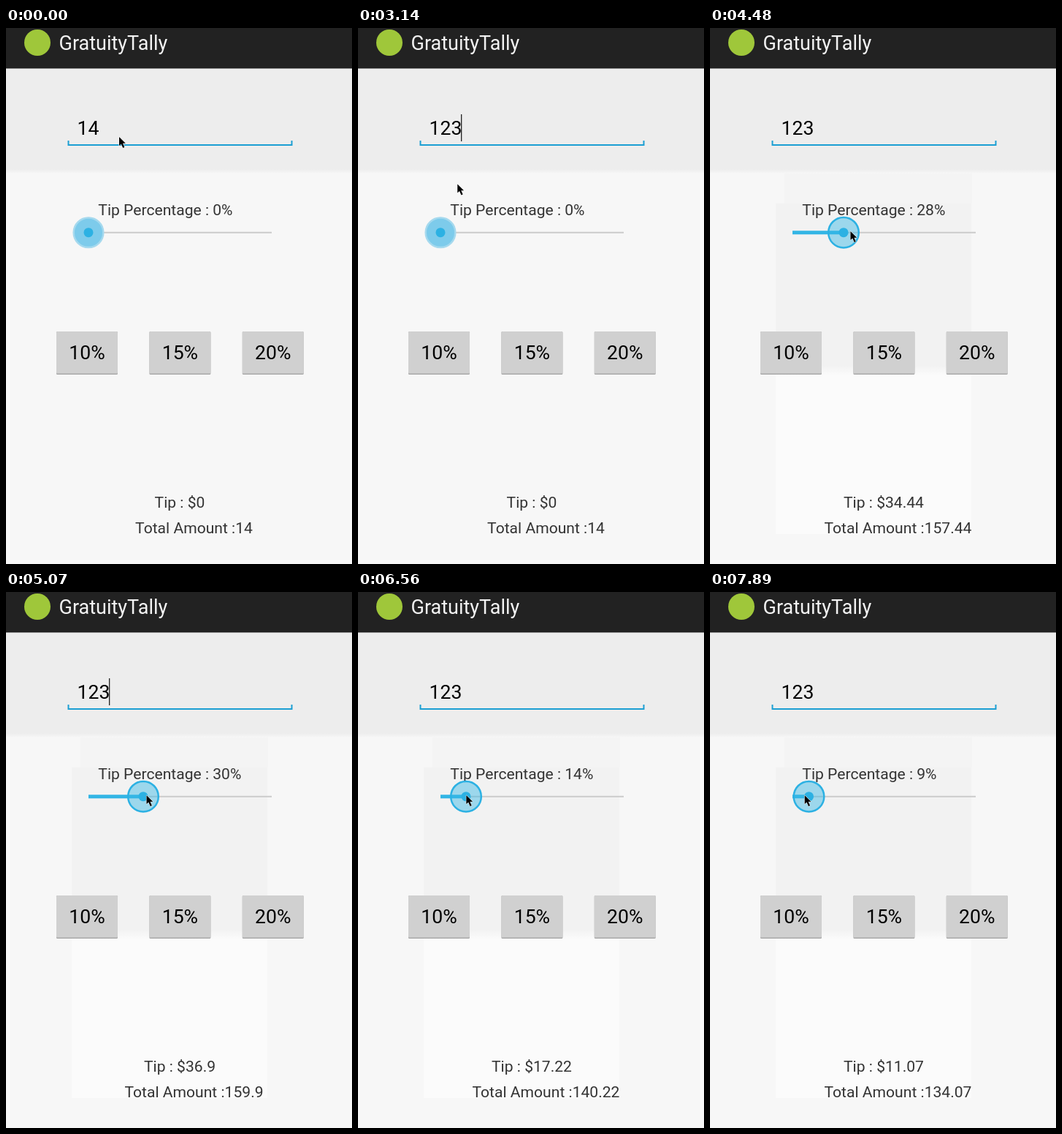
Recreate the animation shown at these times as an HTML page. Size 474 by 733 pixels, loop 8000 ms.

```html
<!DOCTYPE html>
<html lang="en">
<head>
<meta charset="utf-8">
<style>
  html, body { margin: 0; width: 100%; height: 100%; overflow: hidden; background: #f7f7f7; }
  svg { display: block; font: 21.1px Roboto, sans-serif; fill: #333; }
  .big { font-size: 26.6px; fill: #000; }
  .mid { text-anchor: middle; }
</style>
</head>
<body>
<svg width="474" height="733" viewBox="0 0 474 733">
  <defs>
    <linearGradient id="shade" x2="0" y2="1">
      <stop offset=".49" stop-color="#f2f2f2"/>
      <stop offset=".52" stop-color="#fbfbfb"/>
    </linearGradient>
    <linearGradient id="fade" x2="0" y2="1">
      <stop offset=".96" stop-color="#ededed"/>
      <stop offset="1" stop-color="#f7f7f7"/>
    </linearGradient>
  </defs>
  <rect width="474" height="733" fill="#f7f7f7"/>
  <rect y="54" width="474" height="145" fill="url(#fade)"/>
  <rect width="474" height="55.4" fill="#222"/>
  <circle cx="43" cy="20" r="18" fill="#9fc73a"/>
  <text x="72.5" y="29.5" font-size="27" fill="#f3f3f3">GratuityTally</text>

  <rect id="strip" x="102" y="199" width="257" height="41" fill="#f4f4f4"/>
  <rect id="panel" x="90" y="240" width="268" height="452" fill="url(#shade)"/>

  <path d="M85.5 154v6h306v-6" fill="none" stroke="#1c9fd3" stroke-width="2"/>
  <text id="entry" class="big" x="97.5" y="146.2"></text>
  <rect id="caret" y="118" width="1.3" height="37" fill="#222"/>

  <text id="label" x="126.3" y="256.3"></text>
  <path d="M113 279.7H364" stroke="#cbcbcb" stroke-width="2"/>
  <path id="bar" stroke="#33b5e5" stroke-width="5"/>
  <g id="thumb">
    <circle id="disc" stroke-width="2.5"/>
    <circle r="6.5" fill="#2cb1e3"/>
  </g>

  <g id="buttons"></g>
  <text id="tip" class="mid" x="238" y="655.8"></text>
  <text id="total" class="mid" x="257.5" y="691.3"></text>
  <path id="pointer" d="M0 0V12L2.8 9.4 5.2 15 7.4 14 5 8.7H8.8Z" fill="#000" stroke="#fff" paint-order="stroke"/>
</svg>
<script>
const LOOP = 8000, TICK = 1040 / 7, BILL = 123, LEFT = 113, STEP = 2.5;
const $ = id => document.getElementById(id);
const set = (id, attrs) => {
  for (const name in attrs) $(id).setAttribute(name, attrs[name]);
};
const show = (id, on) => set(id, { visibility: on ? "visible" : "hidden" });

$("buttons").innerHTML = [10, 15, 20].map((n, i) => {
  const x = 69 + i * 127.4;
  return `<rect x="${x}" y="415" width="84" height="59" rx="1.5" fill="#aaa"/>
    <rect x="${x}" y="415" width="84" height="57.5" rx="1.5" fill="#d0d0d0"/>
    <text class="big mid" x="${x + 42}" y="453.3">${n}%</text>`;
}).join("");

// Smooth step from 0 to 1
function ramp(k, start, length) {
  const u = Math.min(1, Math.max(0, (k - start) / length));
  return u * u * (3 - 2 * u);
}

// Tip percentage: drag right, then back, then a short swing
const percent = k => 30 * ramp(k, 24.3, 6.8) - 19 * ramp(k, 35.7, 11.1)
  + 4 * ramp(k, 47, 4) - 12 * ramp(k, 51, 4);

function typed(t) {
  if (t < 600) return "14";
  if (t < 900) return "1";
  if (t < 1950) return "";
  return t < 2100 ? "1" : "123";
}

function draw(now) {
  const t = now % LOOP;
  const k = Math.floor((t - 14) / TICK);
  const pct = Math.round(percent(k)), pressed = k >= 25;
  const text = typed(t), knob = LEFT + STEP * pct;

  $("entry").textContent = text || "Enter Total Amount";
  $("entry").style.fill = text ? "#000" : "#888";
  show("caret", t < 2100 ? text === "1" : (k - 13.5) % 6.73 < 3);
  set("caret", { x: text.length > 1 ? 141 : 111 });

  const tip = BILL * pct / 100;
  $("label").textContent = `Tip Percentage : ${pct}%`;
  $("tip").textContent = "Tip : $" + +tip.toFixed(2);
  $("total").textContent = "Total Amount :" + (pressed ? +(BILL + tip).toFixed(2) : 14);

  set("bar", { d: `M${LEFT} 279.7H${knob}` });
  set("thumb", { transform: `translate(${knob} 279.7)` });
  set("disc", pressed
    ? { r: 20.8, fill: "rgba(51,181,229,.45)", stroke: "#2cb1e3" }
    : { r: 20.3, fill: "#7dcbeb", stroke: "#a5d9ee" });
  show("panel", pressed);
  show("strip", k >= 27);

  // The pointer glides to the knob, then leads it by one tick
  const glide = ramp(k, 18.5, 5);
  const x = 155 - 37.5 * glide + STEP * percent(k + 1) * (glide === 1);
  set("pointer", { transform: `translate(${x} ${149 + 129 * glide})` });
}

function frame(now) {
  draw(now);
  requestAnimationFrame(frame);
}
draw(0);
requestAnimationFrame(frame);
</script>
</body>
</html>
```
